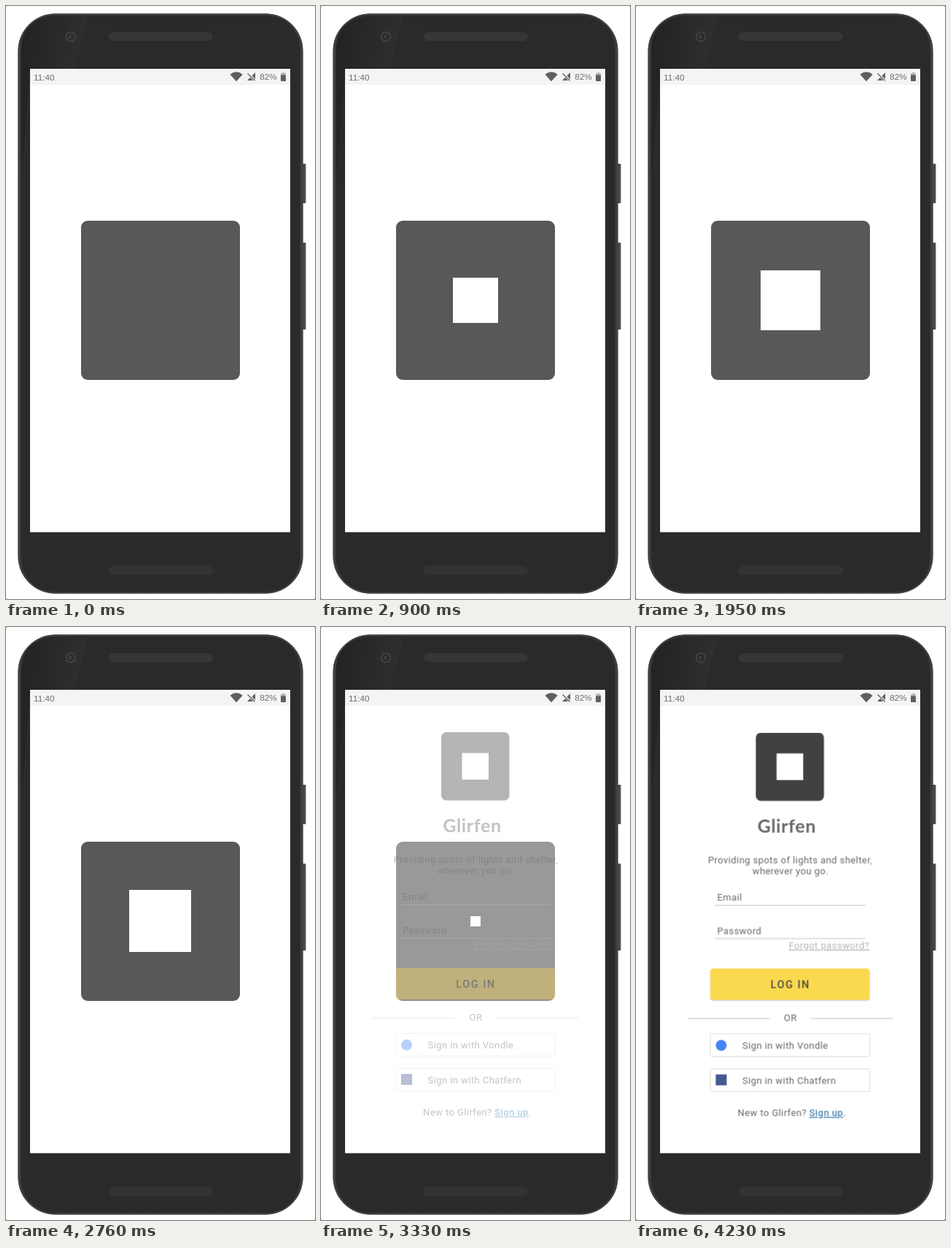
These frames come from a looping animation (424x812 px, 4380 ms). An HTML page:

```html
<!DOCTYPE html>
<html lang="en">
<head>
<meta charset="utf-8">
<title>Login splash</title>
<style>
  html, body { margin: 0; width: 100%; height: 100%; overflow: hidden; background: #888; }
  svg { display: block; width: 424px; height: 812px; }
  text { font: 13px Roboto, sans-serif; letter-spacing: .43px; fill: #666; }
  .mid { text-anchor: middle; }
  .status text { font: 11.7px "Liberation Sans", Arial, sans-serif; letter-spacing: 0; fill: #6b6b6b; }
  .brand { font: 700 25px Lato, sans-serif; letter-spacing: .6px; }
  .action { font-weight: 500; font-size: 14.5px; letter-spacing: 1.5px; fill: #4c4a45; }
  .link { font-weight: 500; fill: #4384ad; text-decoration: underline; }
  .hint { fill: #b3b3b3; text-decoration: underline; }
  .rule { stroke: #c4c4c4; }
  .option { fill: #fff; stroke: #dcdcdc; }
  #mark { transform-box: fill-box; transform-origin: center; transform: scale(0); }
  #login { opacity: 0; }
</style>
</head>
<body>
<svg viewBox="0 0 424 812">
  <defs>
    <linearGradient id="edge">
      <stop offset="0" stop-color="#454647"/>
      <stop offset=".012" stop-color="#353637"/>
      <stop offset=".04" stop-color="#2b2b2b"/>
      <stop offset=".97" stop-color="#2b2b2b"/>
      <stop offset=".99" stop-color="#363738"/>
      <stop offset="1" stop-color="#47494a"/>
    </linearGradient>
    <linearGradient id="key">
      <stop offset="0" stop-color="#303132"/>
      <stop offset="1" stop-color="#55575a"/>
    </linearGradient>
    <linearGradient id="sheen" x2="1" y2=".25">
      <stop offset="0" stop-color="#222"/>
      <stop offset="1" stop-color="#303030"/>
    </linearGradient>
  </defs>

  <rect width="424" height="812" rx="2" fill="#fff"/>

  <g id="phone">
    <rect x="405" y="216" width="6.5" height="54" rx="1" fill="url(#key)"/>
    <rect x="405" y="324" width="6.5" height="119" rx="1" fill="url(#key)"/>
    <rect x="16.5" y="10.5" width="391" height="794" rx="51" fill="url(#edge)"/>
    <rect x="17.5" y="11.5" width="389" height="792" rx="50" fill="none" stroke="#414243" stroke-width="2"/>
    <rect x="20.5" y="14.5" width="383" height="786" rx="47" fill="#2a2a2a"/>
    <path d="M21 240V62Q21 15 68 15H112L94 86H33Z" fill="url(#sheen)"/>
    <rect x="141" y="36" width="143" height="12" rx="6" fill="#363636"/>
    <rect x="141" y="767" width="143" height="12" rx="6" fill="#333" stroke="#373737" stroke-width=".6"/>
    <circle cx="89" cy="42" r="7.5" fill="#3d3e3f"/>
    <circle cx="89" cy="42" r="4.7" fill="#252627"/>
    <circle cx="89" cy="42" r="2.8" fill="#444547"/>
    <circle cx="90" cy="42" r="1.3" fill="#222"/>
    <rect x="33" y="86" width="357" height="634.5" fill="#fff"/>
  </g>

  <g class="status">
    <rect x="33" y="86" width="357" height="22" fill="#f5f3f4"/>
    <text x="38" y="102">11:40</text>
    <path d="M307.5 93.7Q316 87 324.700 93.700L316 103.300Z" fill="#5f5f5f"/>
    <path d="M342 91V102L331 102Z" fill="#5f5f5f"/>
    <path d="M331 91.500L342 102.500" stroke="#f5f3f4" stroke-width="3.200"/>
    <path d="M331.500 92.500L341.500 102.300" stroke="#5f5f5f" stroke-width="1.300"/>
    <text x="348.300" y="101">82%</text>
    <path d="M379 91H382V92H384V95H377V92H379Z" fill="#b4b4b4"/>
    <rect x="377" y="94.500" width="7" height="8.500" rx=".8" fill="#5f5f5f"/>
  </g>

  <g id="splash">
    <rect x="103" y="294" width="218" height="218" rx="9" fill="#5a5759"/>
    <rect id="mark" x="162" y="353" width="100" height="100" fill="#fff"/>
  </g>

  <g id="login">
    <rect x="165" y="144" width="93.500" height="93.500" rx="7" fill="#414140"/>
    <rect x="193.500" y="172.500" width="36.500" height="36.500" fill="#fff"/>
    <text class="brand mid" x="207.500" y="281">Glirfen</text>
    <text class="mid" x="212.200" y="323">Providing spots of lights and shelter,</text>
    <text class="mid" x="212.500" y="338">wherever you go.</text>

    <text x="112" y="374">Email</text>
    <path class="rule" d="M109 380.500H315.500"/>
    <text x="112" y="419.500">Password</text>
    <path class="rule" d="M109 426H315.500"/>
    <text class="hint" x="210.200" y="440">Forgot password?</text>

    <rect x="102.500" y="468.500" width="219" height="43" rx="4" fill="#000" opacity=".16"/>
    <rect x="102.500" y="467" width="218.500" height="43" rx="4" fill="#fbd94f"/>
    <text class="action mid" x="212.500" y="493.500">LOG IN</text>

    <path class="rule" d="M71 535.500H184M240 535.500H353"/>
    <text class="mid" x="212.500" y="539">OR</text>

    <rect class="option" x="102.500" y="556.500" width="219" height="31" rx="2"/>
    <circle cx="117.500" cy="572.300" r="7.500" fill="#4285f4"/>
    <text x="146.500" y="577">Sign in with Vondle</text>

    <rect class="option" x="102.500" y="604.500" width="219" height="31" rx="2"/>
    <rect x="110" y="612" width="15" height="15" fill="#475993"/>
    <text x="146.500" y="625">Sign in with Chatfern</text>

    <text x="140" y="669">New to Glirfen? <tspan class="link">Sign up</tspan>.</text>
  </g>
</svg>

<script>
  const LOOP = 4380;
  const OUT = "cubic-bezier(.2, .6, .4, 1)";
  const FADE = "cubic-bezier(.33, 0, .67, 1)";
  const HOLD = "step-end";

  // Each step: time in ms, value, easing towards the next step.
  function play(id, prop, steps, show) {
    const frames = steps.map(([time, value, easing = "linear"]) =>
      ({ offset: time / LOOP, [prop]: show(value), easing }));
    const run = document.getElementById(id)
      .animate(frames, { duration: LOOP, iterations: Infinity });
    run.startTime = start;
  }

  const start = document.timeline.currentTime ?? 0;
  const plain = v => v;
  const scale = side => `scale(${side / 100})`;
  const shift = d => `translate(${-d}px, ${d}px)`;

  play("mark", "transform", [
    [0, 0, HOLD],
    [75, 14, OUT], [570, 44],
    [600, 44, OUT], [1140, 64],
    [1150, 64, OUT], [1650, 74],
    [1680, 74, OUT], [2220, 83],
    [2310, 83, OUT], [2520, 86, HOLD],
    [2730, 85, HOLD],
    [3180, 14], [LOOP, 14],
  ], scale);

  play("splash", "opacity", [
    [0, 1], [3170, 1, FADE], [3550, 0], [LOOP, 0],
  ], plain);

  play("login", "opacity", [
    [0, 0], [3170, 0, FADE], [3550, 1], [LOOP, 1],
  ], plain);

  play("login", "transform", [
    [0, 0], [3510, 0], [3720, .6], [LOOP, .6],
  ], shift);
</script>
</body>
</html>
```
